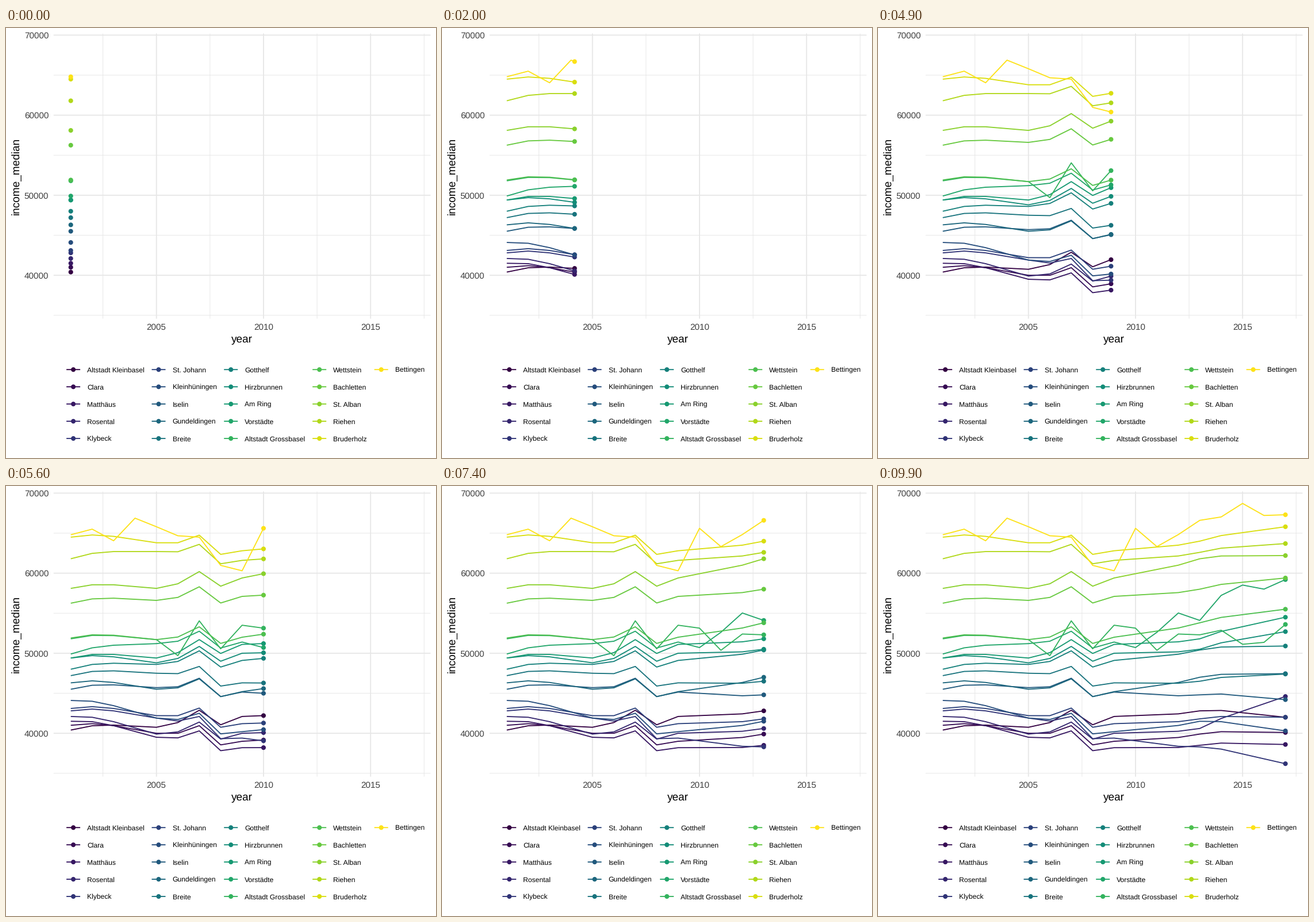
These frames come from a looping animation (748x748 px, 10000 ms). A matplotlib script:

```python
import matplotlib.pyplot as plt
import numpy as np
from matplotlib.animation import FuncAnimation

SIZE, DPI, FRAMES = 748, 100, 100
PX = 72 / DPI
YEARS = np.arange(2001, 2018)
LINE, DOT = 1.85 * PX, 8.1 * PX
GRID, TICK = "#e7e7e7", "#3f3f3f"

plt.rcParams.update({"font.family": "Liberation Sans", "text.hinting": "none"})

# Median income in thousands, every fourth year from 2001 to 2017
LEVELS = {
    "Altstadt Kleinbasel": (40.4, 40.75, 42.1, 42.8, 42),
    "Clara": (41, 40, 39, 39.9, 40.1),
    "Matthäus": (41.5, 39.5, 38.2, 38.5, 38.6),
    "Rosental": (42.1, 39.9, 40, 40.6, 44.6),
    "Klybeck": (42.8, 41.9, 39.4, 38.3, 36.2),
    "St. Johann": (43.1, 42.2, 41.2, 41.8, 42),
    "Kleinhüningen": (44.1, 41.9, 40.2, 41.5, 40.3),
    "Iselin": (45.5, 45.7, 45.15, 44.8, 44.2),
    "Gundeldingen": (46.3, 45.5, 45.2, 47, 47.45),
    "Breite": (47.2, 47.5, 46.3, 46.5, 47.4),
    "Gotthelf": (48, 48.6, 49.1, 50.4, 50.9),
    "Hirzbrunnen": (49.4, 48.8, 50, 50.5, 52.7),
    "Am Ring": (49.4, 49.4, 51.1, 51.8, 54.5),
    "Vorstädte": (49.9, 51.2, 51.4, 54.1, 59.2),
    "Altstadt Grossbasel": (51.8, 51.7, 53.5, 52.3, 53.6),
    "Wettstein": (51.9, 51.7, 52, 53.8, 55.5),
    "Bachletten": (56.25, 56.6, 57.1, 58, 59.4),
    "St. Alban": (58.1, 58.1, 59.4, 61.8, 62.2),
    "Riehen": (61.8, 62.7, 61.6, 62.6, 63.7),
    "Bruderholz": (64.5, 63.8, 62.8, 64, 65.8),
    "Bettingen": (64.8, 65.8, 60.3, 66.6, 67.3),
}

# One-year swings of the most volatile districts
SWINGS = {
    "Vorstädte": {2010: -1.3, 2012: 1.8, 2014: 1.6, 2015: 1.7},
    "Altstadt Grossbasel": {2006: -2.7, 2008: -1.8, 2011: -2.4, 2015: -2, 2016: -2},
    "Bettingen": {2003: -1.7, 2004: 1.1, 2010: 3.8, 2015: 1.6},
}

# Business cycle shared by all districts: boom in 2007, slump in 2008
CYCLE = np.interp(YEARS,
                  [2001, 2002, 2003, 2005, 2006, 2007, 2008, 2009, 2012, 2013, 2014, 2017],
                  [0, 0.45, 0.45, 0, 0.25, 1.45, -0.7, 0, -0.2, 0, 0.25, 0])


def series(name):
    income = np.interp(YEARS, YEARS[::4], LEVELS[name]) + CYCLE
    for year, change in SWINGS.get(name, {}).items():
        income[year - YEARS[0]] += change
    return income


incomes = [series(name) for name in LEVELS]

# viridis, slightly deepened
colors = plt.get_cmap("viridis")(np.linspace(0, 1, len(LEVELS)))[:, :3] ** 1.22


def to_x(year):
    return 261.7 + (np.asarray(year) - 2005) * 37.25


def to_y(income):
    return 290.9 - (np.asarray(income) - 50) * 13.925


fig = plt.figure(figsize=(SIZE / DPI, SIZE / DPI), dpi=DPI, facecolor="white")
ax = fig.add_axes([0, 0, 1, 1])
ax.set(xlim=(0, SIZE), ylim=(SIZE, 0))
ax.axis("off")


def label(x, y, text, size, color="black", ha="center", **kw):
    ax.text(x, y, text, fontsize=size * PX, color=color, ha=ha, va="baseline", **kw)


def stroke(xs, ys, color, width, z):
    return ax.plot(xs, ys, color=color, lw=width, zorder=z, snap=False,
                   solid_capstyle="butt", solid_joinstyle="round")[0]


def dots(xs, ys):
    return ax.scatter(xs, ys, s=DOT ** 2, c=colors, lw=0, zorder=3)


def grid(years, levels, width, z):
    for year in years:
        stroke([to_x(year)] * 2, [9.5, 505.6], GRID, width * PX, z)
    for level in levels:
        stroke([82.8, 738.5], [to_y(level)] * 2, GRID, width * PX, z)


grid(np.arange(2002.5, 2018, 5), range(35, 70, 10), 0.95, 0)
grid(range(2005, 2020, 5), range(40, 71, 10), 1.85, 1)

for level in range(40, 71, 10):
    label(74.3, to_y(level) + 5.5, f"{level}000", 15.3, TICK, "right")
for year in range(2005, 2020, 5):
    label(to_x(year), 525.3, str(year), 15.3, TICK)
label(410.6, 546.8, "year", 19.07)
label(23.2, 257.6, "income_median", 19.07, rotation=90, rotation_mode="anchor")

# Legend, filled column by column
index = np.arange(len(LEVELS))
key_x = np.array([117.1, 265.5, 391.2, 545.2, 652.7])[index // 5]
key_y = 594.2 + 29.95 * (index % 5)
dots(key_x, key_y)
for name, color, x, y in zip(LEVELS, colors, key_x, key_y):
    stroke([x - 12, x + 12], [y, y], color, LINE, 2)
    label(x + 24.2, y + 4.4, name, 12.13, ha="left")

lines = [stroke([], [], color, LINE, 2) for color in colors]
heads = dots(index * 0, index * 0)

# Each year is reached on a whole frame
stops = np.round(np.linspace(0, FRAMES - 1, len(YEARS)))


def draw(frame):
    now = np.interp(frame, stops, YEARS)
    past = YEARS < now
    xs = to_x(np.append(YEARS[past], now))
    tips = []
    for line, income in zip(lines, incomes):
        ys = to_y(np.append(income[past], np.interp(now, YEARS, income)))
        line.set_data(xs, ys)
        tips.append((xs[-1], ys[-1]))
    heads.set_offsets(tips)
    return [*lines, heads]


anim = FuncAnimation(fig, draw, frames=FRAMES, interval=100, repeat=True, repeat_delay=0)
plt.show()
```
